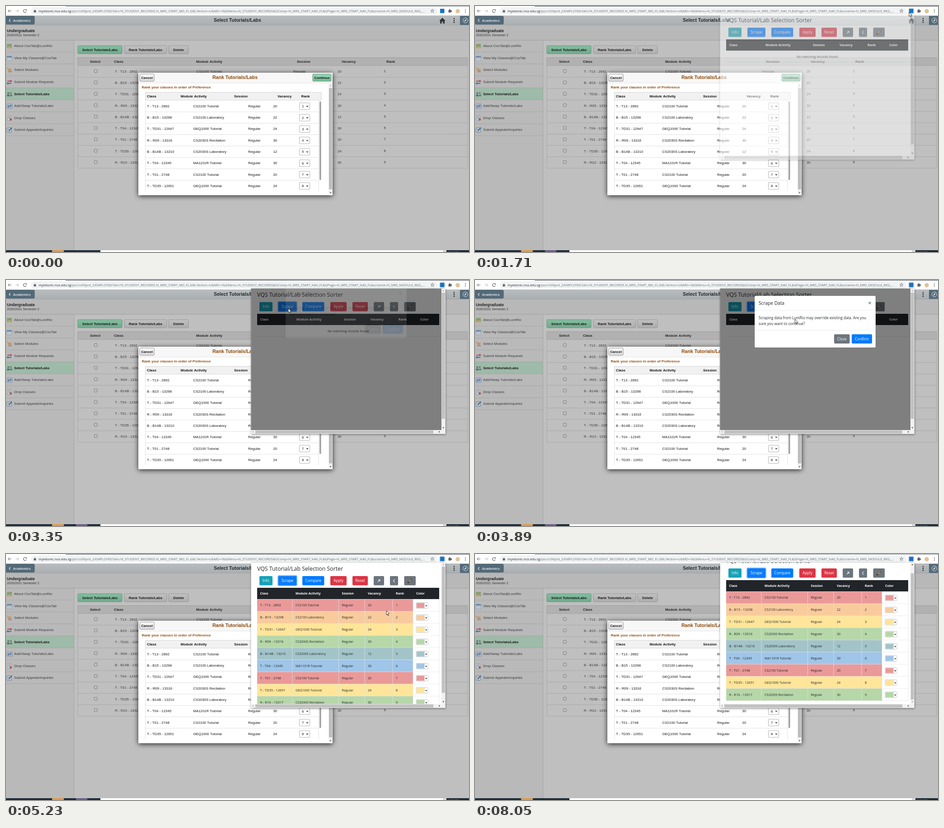
Recreate the animation shown at these times as an HTML page with a canvas. Size 1025 px wide and 546 px high, loop 8130 ms.

```html
<!DOCTYPE html>
<html lang="en">
<head>
<meta charset="utf-8">
<title>Tutorial ranking</title>
<style>
html, body { margin: 0; width: 100%; height: 100%; overflow: hidden; background: #bfbfbf; }
canvas { display: block; width: 1025px; height: 546px; }
</style>
</head>
<body>
<canvas id="stage" width="1025" height="546"></canvas>
<script>
const LOOP = 8130;
const ARIAL = '"Liberation Sans", Arial, sans-serif';
const UI = '"Open Sans", "Noto Sans", sans-serif';
const PALETTE = ['#ea9999', '#f9cb9c', '#ffe599', '#b6d7a8', '#a2c4c9', '#9fc5e8'];
const CLASSES = [
  ['T - T13 - 2892', 'CS2100 Tutorial', 20, 0],
  ['B - B15 - 13298', 'CS2100 Laboratory', 22, 1],
  ['T - TD31 - 12647', 'GEQ1000 Tutorial', 24, 2],
  ['R - R09 - 13316', 'CS2030S Recitation', 30, 3],
  ['B - B14B - 13210', 'CS2030S Laboratory', 12, 4],
  ['T - T04 - 12345', 'MA1101R Tutorial', 30, 5],
  ['T - T01 - 2748', 'CS2100 Tutorial', 20, 0],
  ['T - TD35 - 12651', 'GEQ1000 Tutorial', 24, 2],
  ['R - R10 - 13317', 'CS2030S Recitation', 30, 3]
];
const MENU = ['About CosTab@LumRio', 'View My Classes@CosTab', 'Select Modules', 'Submit Module Requests',
  'Select Tutorials/Labs', 'Add/Swap Tutorials/Labs', 'Drop Classes', 'Submit Appeals/Inquiries'];
const HOST = 'myedurec.nus.edu.sg';
const PATH = '/psc/cs90prd_2/EMPLOYEE/SA/c/N_STUDENT_RECORDS.N_MRS_START_MD_FL.GBL?Action=U&MD=Y' +
  '&GMenu=N_STUDENT_RECORDS&GComp=N_MRS_START_NAV_FL&GPage=N_MRS_START_NAV_FL&scname=N_MRS_MODULE_REG_...';

const stage = document.getElementById('stage');
let c = stage.getContext('2d');

const clamp = v => Math.max(0, Math.min(1, v));
const span = (t, a, b) => clamp((t - a) / (b - a));
const smooth = p => p * p * (3 - 2 * p);
const easeOut = p => 1 - (1 - p) ** 2;

function box(x, y, w, h, fill, r = 0, stroke) {
  c.beginPath();
  c.roundRect(x, y, w, h, r);
  if (fill) { c.fillStyle = fill; c.fill(); }
  if (stroke) { c.strokeStyle = stroke; c.lineWidth = 0.8; c.stroke(); }
}
function shape(points, fill, stroke, width = 1, close = true) {
  c.beginPath();
  for (let i = 0; i < points.length; i += 2) c.lineTo(points[i], points[i + 1]);
  if (close) c.closePath();
  if (fill) { c.fillStyle = fill; c.fill(); }
  if (stroke) { c.strokeStyle = stroke; c.lineWidth = width; c.stroke(); }
}
function line(points, color, width = 1) { shape(points, null, color, width, false); }
function dot(x, y, r, fill, stroke, width = 1) {
  c.beginPath();
  c.arc(x, y, r, 0, 7);
  if (fill) { c.fillStyle = fill; c.fill(); }
  if (stroke) { c.strokeStyle = stroke; c.lineWidth = width; c.stroke(); }
}
// y is the middle of the capitals
function text(s, x, y, size, color, weight = 400, font = ARIAL, align = 'left') {
  c.font = `${weight} ${size}px ${font}`;
  c.fillStyle = color;
  c.textAlign = align;
  c.fillText(s, x, y + size * 0.36);
}
function clip(x, y, w, h, draw) {
  c.save();
  c.beginPath();
  c.rect(x, y, w, h);
  c.clip();
  draw();
  c.restore();
}
function shadow(color, blur, dy, draw) {
  c.save();
  c.shadowColor = color;
  c.shadowBlur = blur;
  c.shadowOffsetY = dy;
  draw();
  c.restore();
}
function layer(draw) {
  const l = document.createElement('canvas');
  l.width = 1025;
  l.height = 546;
  const main = c;
  c = l.getContext('2d');
  draw();
  c = main;
  return l;
}
// fades and shifts a drawing as one piece
function fade(alpha, dy, draw) {
  if (alpha === 1) return draw();
  const l = layer(draw);
  c.save();
  c.globalAlpha = alpha;
  c.drawImage(l, 0, dy);
  c.restore();
}
// small triangle pointing along (dx, dy)
function tip(x, y, dx, dy, color = '#505050', s = 2) {
  shape([x + dx * s, y + dy * s, x - dy * s - dx * s * .4, y + dx * s - dy * s * .4,
    x + dy * s - dx * s * .4, y - dx * s - dy * s * .4], color);
}

function toolbar() {
  box(0, 0, 1025, 21, '#fff');
  box(55, 3, 900, 16, '#f1f3f4', 8);
  const ink = '#5f6368';
  line([12, 11, 5, 11], ink); line([8, 7.5, 4.7, 11, 8, 14.5], ink);
  line([21, 11, 28, 11], '#b4b7ba'); line([25, 7.5, 28.3, 11, 25, 14.5], '#b4b7ba');
  c.beginPath(); c.arc(42, 11, 3.3, 0.5, 5.5); c.strokeStyle = ink; c.lineWidth = 1.1; c.stroke();
  shape([43, 10.2, 46, 10.2, 46, 7], ink);
  box(61.5, 10, 5, 4.2, ink, .5);
  c.beginPath(); c.arc(64, 10, 1.5, Math.PI, 0); c.lineWidth = .8; c.stroke();
  text(HOST, 72, 11, 7.25, '#27292c', 400, UI);
  text(PATH, 72 + c.measureText(HOST).width, 11, 7.25, '#6b6f74', 400, UI);
  const star = [];
  for (let i = 0; i < 10; i++) {
    const r = i % 2 ? 1.7 : 4, a = i * Math.PI / 5 - Math.PI / 2;
    star.push(944 + r * Math.cos(a), 11 + r * Math.sin(a));
  }
  shape(star, null, ink, .8);
  box(979.5, 9, 6, 5.5, ink, .6); dot(982.3, 8.4, 1.4, ink); dot(986, 11.5, 1.4, ink);
  dot(1000, 11.5, 4.8, '#dfc49a');
  for (let i = -1; i < 2; i++) dot(1017, 11 + i * 3, .9, ink);
}

function menuIcon(i) {
  const y = 89 + i * 26.55;
  if (i === 0) {
    box(2, y - 5, 11, 10, '#86a77b', 1); shape([2, y + 5, 8, y - 1, 13, y + 5], '#c9a261');
    line([3, y - 3, 8, y, 12, y - 4], '#b85d4c');
  } else if (i === 1) {
    box(2, y - 4, 11, 10, '#c9ced3', 1, '#7d91a5'); box(2, y - 4, 11, 3, '#5d87af');
    line([4, y + 2, 11, y + 2], '#8c9dad');
  } else if (i === 2) {
    line([2, y - 4, 4, y - 4, 6, y + 2, 12, y + 2], '#b97842'); shape([4.5, y - 3, 13, y - 3, 11.5, y + 1, 6, y + 1], '#cf9657');
    dot(7, y + 4, 1.1, '#885b35'); dot(11, y + 4, 1.1, '#885b35');
  } else if (i === 3) {
    line([3, y - 2, 12, y - 2], '#b64c4c', 2); tip(11, y - 2, 1, 0, '#b64c4c', 3);
    line([3, y + 3, 12, y + 3], '#476b9b', 2); tip(4, y + 3, -1, 0, '#476b9b', 3);
  } else if (i === 4) {
    dot(5, y - 2, 2, '#57717a'); dot(10.5, y - 2, 2, '#6e7f69');
    box(2, y + 1, 6, 4.5, '#57717a', 2); box(8.5, y + 1, 5.5, 4.5, '#6e7f69', 2);
  } else if (i === 5) {
    box(2, y - 4.5, 12, 10, '#bcc4d0', 1, '#657d9d'); line([4, y - 1, 11, y - 1], '#386299', 1.3);
    line([5, y + 2, 12, y + 2], '#386299', 1.3); tip(11, y - 1, 1, 0, '#386299'); tip(5, y + 2, -1, 0, '#386299');
  } else if (i === 6) {
    box(3, y - 5, 8, 11, '#c4c9ce', 1, '#8190a0'); line([5, y - 2, 9, y - 2], '#60788f');
    line([5, y + 1, 9, y + 1], '#60788f'); dot(10.5, y + 3.5, 2.5, '#b95444');
  } else {
    box(2, y - 4.5, 10, 10, '#c4cad0', 1, '#51687e'); line([4, y - 1, 8, y - 1], '#51687e');
    line([6, y + 3, 13, y - 5], '#2e5b88', 1.8);
  }
}

function pillButton(s, x, y, w, h, top, bottom, edge) {
  const g = c.createLinearGradient(0, y, 0, y + h);
  g.addColorStop(0, top); g.addColorStop(1, bottom);
  box(x, y, w, h, g, 2, edge);
  text(s, x + w / 2, y + h / 2, 7.85, '#161616', 700, ARIAL, 'center');
}

function portal() {
  box(0, 21, 1025, 525, '#bfbfbf');
  const bar = c.createLinearGradient(0, 21, 0, 42);
  bar.addColorStop(0, '#b9bdc0'); bar.addColorStop(1, '#a9aeb1');
  box(0, 21, 1025, 21, bar);
  box(0, 42, 1025, 34, '#b8b8b8');
  box(0, 76, 150, 466, '#b9b9b9');
  line([0, 42.5, 1025, 42.5], '#9a9d9f', .7);
  line([0, 76, 1025, 76], '#989898', .8);
  line([150.5, 76, 150.5, 542], '#9b9b9b', .8);
  box(0, 22.5, 63, 18, '#536a79', 2, '#41535f');
  line([9.5, 29, 7, 32, 9.5, 35], '#dce2e6', 1.3);
  text('Academics', 15.5, 32, 7.4, '#dce2e6', 700);
  text('Select Tutorials/Labs', 460, 31.5, 10.5, '#272727', 700);
  shape([959, 33, 966, 26, 973, 33, 971, 33, 971, 39, 967.5, 39, 967.5, 34.5, 964.5, 34.5, 964.5, 39, 961, 39, 961, 33], '#333');
  for (let i = -1; i < 2; i++) dot(992, 32 + i * 4.2, 1.4, '#333');
  box(1005, 22, 20, 20, '#536a79');
  dot(1017, 32, 5.5, null, '#dce2e6', 1); shape([1020, 28.5, 1018, 33, 1014, 35.5, 1016, 31], '#dce2e6');
  text('Undergraduate', 2, 54.5, 8.7, '#1d1d1d', 700);
  text('2020/2021 Semester 2', 2, 64, 7.1, '#333');
  box(0, 181.8, 150, 26.5, '#9ebaa9');
  MENU.forEach((s, i) => {
    const y = 88.5 + i * 26.55;
    line([0, y + 13.6, 150, y + 13.6], '#a2a2a2', .8);
    menuIcon(i);
    text(s, 18, y, 7.85, i === 4 ? '#161616' : '#3a3a3a', i === 4 ? 700 : 400);
  });
  pillButton('Select Tutorials/Labs', 159, 88, 98, 18, '#86bda1', '#6fab8c', '#5c8a73');
  pillButton('Rank Tutorials/Labs', 262, 88, 94, 18, '#c0c0c0', '#adadad', '#8e8e8e');
  pillButton('Delete', 360, 88, 44, 18, '#c0c0c0', '#adadad', '#8e8e8e');

  box(159, 114.5, 863, 17.5, '#b1b1b1', 0, '#9a9a9a');
  [['Select', 186], ['Class', 239], ['Module Activity', 421], ['Session', 644], ['Vacancy', 743], ['Rank', 842]]
    .forEach(([s, x]) => text(s, x, 123.5, 7.85, '#262626', 700));
  CLASSES.forEach(([name, mod, vac], i) => {
    const y = 145 + i * 25.25;
    line([159, y + 12.9, 1022, y + 12.9], '#a3a3a3', .8);
    box(195.5, y - 3.8, 6.5, 6.5, '#c3c3c3', 1, '#666');
    text(name, 241, y, 7.85, '#3a3a3a');
    text(mod, 421.5, y, 7.85, '#3a3a3a');
    text('Regular', 636, y, 7.85, '#3a3a3a');
    text(vac, 734, y, 7.85, '#3a3a3a');
    text(i + 1, 836.5, y - 1, 7.85, '#3a3a3a');
  });
  line([159, 132, 159, 360], '#a3a3a3', .8);
  line([1022, 132, 1022, 360], '#a3a3a3', .8);
}

function rankDialog() {
  shadow('rgba(0,0,0,.8)', 12, 2, () => box(293, 148, 430, 272, '#fff', 1));
  box(293, 148, 430, 23, '#f7f7f7', 1);
  line([293, 171, 723, 171], '#dcdcdc', .8);
  pillButton('Cancel', 296, 151, 32, 16, '#fbfbfb', '#dedede', '#757575');
  pillButton('Continue', 679, 151, 41, 16, '#9bd6b8', '#74bd97', '#547f6a');
  text('Rank Tutorials/Labs', 457, 158.3, 10.55, '#8c4a0c', 700);
  text('Rank your classes in order of Preference', 300.5, 180.3, 7.87, '#8c4a0c', 700);
  box(308.5, 191.5, 389.5, 17.5, '#f1f1f1', 0, '#cfcfcf');
  [['Class', 312], ['Module Activity', 386.5], ['Session', 505], ['Vacancy', 601], ['Rank', 653.5]]
    .forEach(([s, x]) => text(s, x, 200, 7.85, '#111', 700));
  clip(300, 209, 414, 202, () => {
    CLASSES.forEach(([name, mod, vac], i) => {
      const y = 222 + i * 25.28;
      line([308.5, y + 13, 692, y + 13], '#d8d8d8', .8);
      text(name, 312, y, 7.86, '#151515');
      text(mod, 414.5, y, 7.86, '#151515');
      text('Regular', 536, y, 7.86, '#151515');
      text(vac, 591.5, y, 7.86, '#151515');
      box(649.5, y - 7, 23, 15, '#fff', 1.5, '#9c9c9c');
      text(i + 1, 655, y + .5, 7.86, '#151515');
      line([665, y - .5, 667, y + 1.6, 669, y - .5], '#222', 1.2);
    });
    line([308.5, 209, 308.5, 411], '#d8d8d8', .8);
    line([692, 209, 692, 411], '#d8d8d8', .8);
  });
  box(694, 212, 3.6, 174, '#a2a2a2', 1);
  box(714, 172, 9, 247, '#f1f1f1');
  box(715, 182, 7, 225, '#bdbdbd');
  tip(718.5, 177, 0, -1, '#a3a3a3'); tip(718.5, 414, 0, 1);
}

function taskbar(t) {
  box(0, 542, 1025, 4, '#fff');
  box(0, 542, 209, 4, '#1c2d3a');
  box(102, 542, 26, 4, '#e29a45');
  if (t >= 1400 && t < 8050) box(155, 542, 25, 4, '#6a5d8c');
  box(967, 542, 8, 4, '#d6d8da');
  box(975, 542, 50, 4, '#1b2836');
  clip(975, 542, 50, 4, () => text('10:21 PM', 977, 547, 6, '#dde3e8', 400, UI));
  box(132, 0, 893, 1, t >= 1640 && t < 8050 ? '#3c4753' : '#77808a');
}

const BUTTONS = [['Info', 561, 29, '#17a2b8'], ['Scrape', 603, 40, '#007bff'], ['Compare', 656, 48.5, '#007bff'],
  ['Apply', 718, 36, '#dc3545'], ['Reset', 767, 34, '#dc3545'], ['', 814, 23, '#6c757d'], ['', 850, 18, '#6c757d'], ['', 881.5, 25.5, '#6c757d']];

function popupHead(t) {
  text('VQS Tutorial/Lab Selection Sorter', 556, 33, 12.35, '#212529', 500, UI);
  const focus = (t >= 3100 && t < 4690) || t >= 5200;
  const hover = t > 2780 && t < 3250;
  BUTTONS.forEach(([s, x, w, color], i) => {
    if (i === 1 && focus) box(x - 2, 47, w + 4, 24, 'rgba(0,123,255,.5)', 3.5);
    box(x, 49, w, 20.5, i === 1 && (hover || focus) ? (hover ? '#0069d9' : '#0a7cf8') : color, 2.2);
    text(s, x + w / 2, 59.5, 8.25, '#fff', 400, UI, 'center');
  });
  line([823, 62, 828, 57], '#fff', 1.1); line([824, 57, 828, 57, 828, 61], '#fff', 1.1);
  line([860.5, 56, 857.5, 59.5, 860.5, 63], '#fff', 1.1);
  line([889.5, 64, 898, 55.5], '#2b2620', 2.8);
  line([891.5, 62, 897.3, 56.2], '#dda14e', 1.8);
}

function swatch(x, y, color) {
  box(x, y - 6.3, 26, 13, '#fff', 1.5, '#bbb');
  if (color) box(x + 1, y - 5.3, 17, 11, color);
  else for (let i = 0; i < 24; i++) {
    const u = i % 6, v = i / 6 | 0;
    box(x + 1 + u * 2.8, y - 5.3 + v * 2.8, 2.8, 2.8, (u + v) % 2 ? '#fff' : '#b5b5b5');
  }
  line([x + 18.5, y - 6, x + 18.5, y + 6.5], '#ccc', .7);
  tip(x + 22.2, y + .5, 0, 1, '#444', 2.2);
}

function popupTable(mode) {
  const cols = [[563, 643, 748, 807, 869, 917], [562.5, 639, 739, 796, 855, 900], [562.5, 641, 743.5, 801, 863, 908]][mode];
  const right = mode === 1 ? 950 : 959;
  box(556, 75, right - 556, 25, '#212529');
  ['Class', 'Module Activity', 'Session', 'Vacancy', 'Rank', 'Color']
    .forEach((s, i) => text(s, cols[i], 87.7, 7.1, '#fff', 700, UI));
  if (mode === 0) {
    text('No matching records found', 757.5, 113, 7.15, '#212529', 400, UI, 'center');
    line([556, 125.5, 959, 125.5], '#dee2e6', .8);
    return;
  }
  clip(550, 100, 414, mode === 1 ? 218 : 300, () => CLASSES.forEach(([name, mod, vac, k], i) => {
    const top = 100.3 + i * 26.9, y = top + (mode === 1 ? 13 : 13.5);
    box(556, top, cols[5] - 563, 26.9, PALETTE[k]);
    line([556, top, right, top], '#dee2e6', .7);
    cols.slice(1).forEach(x => line([x - 7, top, x - 7, top + 26.9], '#dee2e6', .8));
    text(name, cols[0], y, 7.45, '#212529', 400, UI);
    [mod, 'Regular', vac, i + 1].forEach((s, j) => text(s, cols[j + 1], y, 7.15, '#212529', 400, UI));
    swatch(cols[5], y + .3, mode === 2 && PALETTE[k]);
  }));
  line([right, 100, right, mode === 1 ? 318 : 342.4], '#dee2e6', .7);
  if (mode === 1) {
    box(950, 75, 9, 243, '#f1f1f1');
    box(951, 84, 7, 204, '#c1c1c1');
    tip(954.5, 80, 0, -1, '#a3a3a3'); tip(954.5, 313, 0, 1);
  } else line([556, 342.4, 959, 342.4], '#dee2e6', .8);
}

function confirmBox(t) {
  box(619, 35, 268, 115, '#fff', 2.5, 'rgba(0,0,0,.2)');
  line([619, 67, 887, 67], '#dee2e6', .7);
  line([619, 111.5, 887, 111.5], '#dee2e6', .7);
  text('Scrape Data', 628, 51.5, 10.2, '#212529', 500, UI);
  line([871.5, 48.5, 876.5, 53.5], '#777', 1.2); line([876.5, 48.5, 871.5, 53.5], '#777', 1.2);
  text('Scraping data from LumRio may override existing data. Are you', 628, 84, 8.15, '#212529', 400, UI);
  text('sure you want to continue?', 628, 97, 8.15, '#212529', 400, UI);
  box(795, 120.5, 34.5, 20.5, '#6c757d', 2.2);
  text('Close', 812.2, 131, 8.2, '#fff', 400, UI, 'center');
  if (t > 4640) box(832, 118.7, 49, 24.2, 'rgba(0,123,255,.5)', 3.5);
  box(834, 120.5, 45, 20.5, t > 4200 ? '#0062cc' : '#007bff', 2.2);
  text('Confirm', 856.5, 131, 8.2, '#fff', 400, UI, 'center');
}

function popup(t) {
  const scroll = 17 * span(t, 5920, 6150);
  shadow('rgba(0,0,0,.5)', 4, 1, () => box(542.5, 19, 430, 322.5, '#fff'));
  clip(542.5, 19, 421.5, 314, () => {
    c.save();
    c.translate(0, -scroll);
    popupHead(t);
    popupTable(t < 4700 ? 0 : t < 4840 ? 1 : 2);
    c.restore();
    const dim = .5 * span(t, 3170, 3320) * (1 - span(t, 4995, 5135));
    if (dim) box(542, 19, 422, 314, `rgba(0,0,0,${dim})`);
    const show = span(t, 3320, 3620), hide = span(t, 4765, 4995);
    const alpha = show * (1 - hide);
    if (alpha) fade(alpha, -27 * (1 - easeOut(show) * (1 - easeOut(hide))), () => confirmBox(t));
  });
  box(964, 19, 8.5, 314, '#f1f1f1');
  box(964.7, 28 + scroll * .88, 7, 280, '#c1c1c1');
  tip(968.3, 24, 0, -1, scroll ? '#505050' : '#a3a3a3'); tip(968.3, 327.5, 0, 1, scroll > 16 ? '#a3a3a3' : '#505050');
  box(542.5, 333, 430, 8.5, '#f1f1f1');
  box(552, 333.7, 394, 7, '#c1c1c1');
  tip(547, 337, -1, 0, '#a3a3a3'); tip(959, 337, 1, 0);
}

// start, end, from x, y, to x, y
const MOVES = [[40, 850, 1005, 546, 985, 36], [890, 1330, 985, 36, 961, 14], [1980, 2900, 961, 14, 625, 63],
  [3600, 4290, 625, 63, 842, 126], [6600, 6720, 842, 126, 841.3, 123], [6900, 7760, 841.3, 123, 973, 547]];

function pointer(t) {
  if (t < 70 || t >= 7760) return;
  let x = 1005, y = 546;
  MOVES.forEach(([a, b, x0, y0, x1, y1]) => {
    if (t < a) return;
    const p = smooth(span(t, a, b));
    x = x0 + (x1 - x0) * p;
    y = y0 + (y1 - y0) * p;
  });
  c.save();
  c.translate(x, y);
  c.lineJoin = 'round';
  const hand = (t > 2780 && t < 3250) || (t > 4230 && t < 4850);
  if (hand) shape([1, 1, 2, .3, 3, 1, 3, 4, 6.8, 5, 7.3, 6, 6.8, 9, 6, 11, 2.2, 11, -1, 7, -.8, 6, .2, 6, 1, 7], '#fff', '#000', .8);
  else shape([0, 0, 0, 9.2, 2.1, 7.4, 3.6, 10.8, 5, 10.2, 3.6, 6.9, 6.4, 6.7], '#fff', '#111', .8);
  c.restore();
}

const backdrop = layer(() => { portal(); rankDialog(); toolbar(); });

function frame(now) {
  const t = now % LOOP;
  c.drawImage(backdrop, 0, 0);
  if (t >= 1640) dot(965.7, 11, 8, '#e3e5e7');
  box(961, 6.2, 9.5, 9.5, '#1373c8');
  taskbar(t);
  const p = span(t, 1640, 1780);
  if (p) fade(p, -2 * (1 - p), () => popup(t));
  pointer(t);
  requestAnimationFrame(frame);
}
requestAnimationFrame(frame);
</script>
</body>
</html>
```
